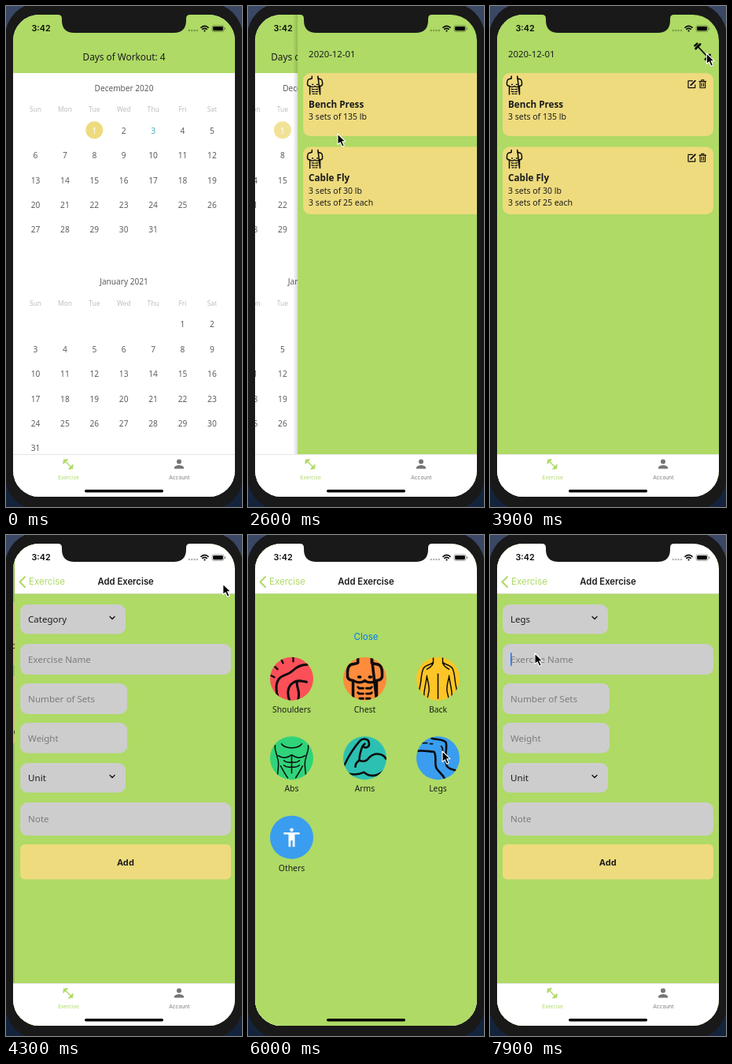
Animation of 300x635 px, one loop 8 s. Source, as an HTML page:

```html
<!DOCTYPE html>
<html lang="en">
<head>
<meta charset="utf-8">
<title>Workout planner</title>
<style>
  html, body { margin: 0; width: 100%; height: 100%; overflow: hidden; background: #14233c; }
  svg { display: block; width: 300px; height: 635px; }
  text { font-family: "Noto Sans", "Open Sans", sans-serif; fill: #1c1c1c; white-space: pre; }
  .ui { font-family: Inter, "Liberation Sans", sans-serif; }
  .mid { text-anchor: middle; }
  .b { font-weight: 600; }
  .line { fill: none; stroke: #0c0c0c; stroke-linecap: round; stroke-linejoin: round; }
</style>
</head>
<body>
<svg id="stage" viewBox="0 0 300 635" xmlns="http://www.w3.org/2000/svg"></svg>
<script>
const GREEN = '#aeda65', YELLOW = '#eedb7e', GRAY = '#cdcdcd';
const WIDTH = 282, LOOP = 8000, STEP = 100;

// y is the middle of the line
const text = (s, x, y, size, cls = '', fill = '#1c1c1c') =>
  `<text x="${x}" y="${y + size * 0.36}" font-size="${size}" class="${cls}" style="fill:${fill}">${s}</text>`;
const rect = (x, y, w, h, fill, r = 0) =>
  `<rect x="${x}" y="${y}" width="${w}" height="${h}" rx="${r}" fill="${fill}"/>`;
const line = (d, w = 1.5, color = '#0c0c0c') =>
  `<path class="line" d="${d}" stroke-width="${w}" style="stroke:${color}"/>`;
const at = (x, y, body, scale = 1) => `<g transform="translate(${x} ${y}) scale(${scale})">${body}</g>`;
const mirror = body => body + `<g transform="scale(-1 1)">${body}</g>`;
const group = (id, body) => `<g id="${id}">${body}</g>`;

function month(title, y, first, days, mark, today) {
  const col = i => 37.5 + 37.4 * i;
  let out = text(title, 150, y, 10.1, 'mid', '#5c5c5c');
  'Sun Mon Tue Wed Thu Fri Sat'.split(' ').forEach((d, i) => {
    out += text(d, col(i), y + 27, 8.4, 'mid', '#bdbdbd');
  });
  for (let d = 1; d <= days; d++) {
    const n = first + d - 1, x = col(n % 7), dy = y + 54.3 + 31.35 * Math.floor(n / 7);
    if (d === mark) out += group('mark', `<circle cx="${x}" cy="${dy - 1}" r="11" fill="${YELLOW}"/>`);
    out += text(d, x, dy, 10.2, 'mid', d === mark ? '#fff' : d === today ? '#3fafc4' : '#5e5e5e');
  }
  return out;
}

const calendar = rect(9, 11, WIDTH, 611, '#fff') + rect(9, 11, WIDTH, 74, GREEN) +
  text('Days of Workout: 4', 150, 64.7, 11.8, 'mid') +
  month('December 2020', 104, 2, 31, 1, 3) + month('January 2021', 349.5, 5, 31);

const chest = line('M-4 -12 V-9.2 C-5.5 -8.4 -7 -8.6 -8.2 -8 C-9.8 -7 -10 -5.5 -10 -3.5 V-1.2 C-9.8 .4 -8.4 .9 -6.8 1 V12 M6.8 12 V1 C8.4 .9 9.8 .4 10 -1.2 V-3.5 C10 -5.5 9.8 -7 8.2 -8 C7 -8.6 5.5 -8.4 4 -9.2 V-12 Z', 1.6) +
  line('M-6.5 1 C-4.5 2.6 -1.5 2.4 0 1 C1.5 2.4 4.5 2.6 6.5 1', 1.4) +
  mirror(line('M-3.6 -1 H-2.6', 1.5) + line('M-.9 5.5 H-3.2 L-4 4.8 M-.9 8.6 H-3.2 L-4 8 M-.9 11.4 H-3', 1.3));

const edit = line('M1 -4 H-4.5 V4.8 H4.2 V1', 1.2) + line('M-1.2 1.5 L4.3 -4', 1.9);
const trash = line('M-4.3 -3.2 H4.3 M-1.5 -3.4 V-5 H1.5 V-3.4 M-3.3 -3 V5 H3.3 V-3 M-1.2 -1 V3 M1.2 -1 V3', 1.1);
const barbell = line('M-7 -7.5 L7 7.5', 1.8) +
  [-1, 1].map(s => line(`M${s * 9} ${s * 4} L${s * 3.5} ${s * 9.5}`, 3) +
    line(`M${s * 10.2} ${s * 7.6} L${s * 7.2} ${s * 10.4}`, 2.4)).join('');

const card = (y, h, title, sets) => rect(16, y, 268, h, YELLOW, 9) +
  at(31, y + 15.5, chest, 0.95) + at(256.5, y + 13.8, edit) + at(270.3, y + 13.8, trash) +
  text(title, 23, y + 39.3, 11.7, 'b') +
  sets.map((s, i) => text(s, 23, y + 55.7 + 15.5 * i, 10.5)).join('');

const shadow = '<rect x="3" y="11" width="6" height="611" fill="url(#edge)"/>';

const list = shadow + rect(9, 11, WIDTH, 611, GREEN) +
  text('2020-12-01', 23, 61, 11.4) + at(270.5, 58, barbell) +
  card(85, 80, 'Bench Press', ['3 sets of 135 lb']) +
  card(178.5, 85.5, 'Cable Fly', ['3 sets of 30 lb', '3 sets of 25 each']);

const field = (y, w, h, label, fill = '#7c7c7c') =>
  rect(16, y, w, h, GRAY, 9) + text(label, 26, y + h / 2 + 0.3, 11.6, '', fill);
const chevron = y => line(`M130 ${y - 1.5} l3 3 l3 -3`, 1.3);

const form = shadow + rect(9, 11, WIDTH, 611, GREEN) + rect(9, 11, WIDTH, 63.5, '#fff') +
  rect(9, 74, WIDTH, 0.6, '#c9cfc0') +
  line('M22 53 L15.5 59.5 L22 66', 2, GREEN) +
  text('Exercise', 27, 59.2, 11.5, 'ui', GREEN) +
  text('Add Exercise', 150, 59.2, 11.3, 'ui mid b') +
  rect(16, 88, 134, 37.5, GRAY, 9) +
  group('pick', text('Category', 26, 107, 11.5)) + group('picked', text('Legs', 26, 107, 11.5)) + chevron(105) +
  field(138, 268, 39, 'Exercise Name') + field(188, 136, 39, 'Number of Sets') +
  field(238, 136, 38.5, 'Weight') + field(289, 134, 37.5, 'Unit', '#1c1c1c') + chevron(306) +
  field(339, 268, 42, 'Note') + rect(16, 392, 268, 44.5, YELLOW, 6) +
  text('Add', 150, 414.5, 11.2, 'mid b') +
  group('caret', rect(26, 149, 1.7, 17, '#2f7bea', 0.8));

// Each muscle icon is drawn around the middle of its disc
const muscles = [
  ['Shoulders', '#fb5058', line('M-17 25 C-20 17 -21 6 -16 0 C-11 -6 -5 -4 1 -10 C6 -15 11 -18 20 -18 M-3 27 C-6 18 -5 9 2 5 C7 1 13 3 19 4 M7 3 C5 11 12 15 8 27', 3) +
    line('M-26 -4 L-22 -2 M-21 -15 L-18 -12 M-13 -24 L-11 -20 M2 -27 V-22', 2.4)],
  ['Chest', '#fd8c3c', at(0, 0, chest, 2.2)],
  ['Back', '#fdc526', mirror(line('M-6 -27 V-21 C-9 -17 -17 -18 -19 -12 C-22 -4 -21 3 -23 10 C-25 16 -24 20 -24 25 M-14 -4 C-15 6 -18 12 -18 25 M-14 -2 C-12 6 -10 12 -12 18 L-14 27 M-6 -20 C-8 -15 -11 -14 -14 -12', 1.5)) +
    line('M0 -6 V25', 1.5)],
  ['Abs', '#2fd37a', mirror(line('M-21 -16 C-22 -10 -19 -6 -18 0 C-15 8 -18 14 -18 24 M-13 -18 C-10 -14 -5 -13 0 -13 M-17 -3 C-12 1 -5 0 0 -4 M-10 3 C-7 6 -3 6 0 5 M-10 9 C-7 12 -3 12 0 11 M-14 10 C-11 15 -9 20 -5 25', 1.5)) +
    line('M0 -4 V19', 1.5)],
  ['Arms', '#2cc0b2', line('M-26 9 C-20 -4 -14 -13 -6 -22 C-2 -26 5 -24 5 -20 C7 -15 2 -11 -3 -15 C-5 -10 -7 -4 -7 3 C-2 5 2 4 5 0 C11 -7 22 -7 27 1 M-24 19 C-14 22 -7 21 -1 18 C7 25 18 23 26 14 M-7 3 C-10 5 -12 8 -12 11 M-3 -15 L0 -18', 2.6)],
  ['Legs', '#3a9def', line('M-8 -25 C0 -23 6 -24 10 -20 C12 -14 9 -8 10 2 C10 9 11 12 17 14 L27 17 M-25 -9 C-18 -10 -10 -8 -5 -8 C-1 -2 -5 7 -2 13 C1 18 6 20 9 27', 2.6) +
    line('M-22 -19 H-14 M-10 -18 H-7 M4 -15 C6 -14 6 -12 6 -9', 1.8)],
  ['Others', '#3a9def', '<circle cy="-9.5" r="2.3" fill="#fff"/>' +
    line('M-9 -5 H9', 2.5, '#fff') + '<path d="M-4 -6 H4 V12 H1.2 V4 H-1.2 V12 H-4Z" fill="#fff"/>']
];

const sheet = rect(9, 74.6, WIDTH, 560, GREEN) + text('Close', 150, 128.8, 11.5, 'ui mid', '#007aff') +
  muscles.map(([name, color, art], i) => {
    const x = 55.5 + 93 * (i % 3), y = 182.2 + 100.5 * Math.floor(i / 3);
    return at(x, y, `<circle r="27.5" fill="${color}"/><g clip-path="url(#disc)">${art}</g>`) +
      text(name, x, y + 38.6, 10.4, 'mid');
  }).join('');

const weights = 'M20.57 14.86L22 13.43 20.57 12 17 15.57 8.43 7 12 3.43 10.57 2 9.14 3.43 7.71 2 5.57 4.14 4.14 2.71 2.71 4.14l1.43 1.43L2 7.71l1.43 1.43L2 10.57 3.43 12 7 8.43 15.57 17 12 20.57 13.43 22l1.43-1.43L16.29 22l2.14-2.14 1.43 1.43 1.43-1.43-1.43-1.43L22 16.29z';
const tabs = rect(9, 568, WIDTH, 54, '#fff') + rect(9, 568, WIDTH, 0.7, '#dcdcdc') +
  at(70.6, 572.4, `<path d="${weights}" fill="${GREEN}"/>`, 0.7) +
  at(220, 580.4, '<circle cy="-3" r="3" fill="#757575"/><path d="M-6 6 V4.5 C-6 2.5 -2 1.5 0 1.5 S6 2.5 6 4.5 V6Z" fill="#757575"/>') +
  text('Exercise', 79.5, 597.5, 6.7, 'ui mid', GREEN) + text('Account', 220.3, 597.5, 6.6, 'ui mid', '#777');

const status = text('3:42', 32.5, 28.3, 10.8, 'ui b', '#0c0c0c') +
  [0, 1, 2, 3].map(i => `<circle cx="${232.8 + 3.4 * i}" cy="31" r="1.2" fill="#000" opacity=".3"/>`).join('') +
  at(252.5, 31.5, line('M-4.6 -4.2 Q0 -8 4.6 -4.2 M-2.7 -2.1 Q0 -4.3 2.7 -2.1', 1.6) + '<circle r="1.1"/>') +
  '<rect x="262" y="24.8" width="15" height="7.6" rx="2.2" fill="none" stroke="#000" stroke-opacity=".45" stroke-width=".8"/>' +
  rect(263.2, 26, 12.6, 5.2, '#000', 1.2) + rect(278, 27.2, 1, 2.8, '#777', 0.5);

document.getElementById('stage').innerHTML = `
  <defs>
    <clipPath id="screen"><rect x="9" y="11" width="${WIDTH}" height="611" rx="33"/></clipPath>
    <clipPath id="disc"><circle r="27.5"/></clipPath>
    <linearGradient id="edge"><stop stop-opacity="0"/><stop offset="1" stop-opacity=".15"/></linearGradient>
    <linearGradient id="desk" x2="0" y2="1"><stop stop-color="#3a4866"/><stop offset="1" stop-color="#14233c"/></linearGradient>
  </defs>` +
  rect(0, 0, 300, 635, 'url(#desk)') + rect(-1, -4, 302, 643, '#191919', 43) +
  '<g clip-path="url(#screen)">' +
  group('calendar', calendar) + group('list', list) + group('form', form) + tabs + group('sheet', sheet) +
  status + '</g>' +
  '<path d="M66 10 H234 V11 Q229 11 229 16 V18 Q229 34 213 34 H87 Q71 34 71 18 V16 Q71 11 66 11Z" fill="#191919"/>' +
  rect(100, 613, 100, 3.4, '#000', 1.7) +
  group('cursor', '<path d="M0 0 V13.5 L3.2 10.8 L5.7 16.2 L8.3 15 L5.8 9.8 H10Z" stroke="#fff" stroke-width="1.1" stroke-linejoin="round"/>');

const el = id => document.getElementById(id);
const move = (id, x, y = 0) => el(id).setAttribute('transform', `translate(${x.toFixed(2)} ${y.toFixed(2)})`);
const show = (id, amount) => el(id).setAttribute('opacity', +amount);

// Critically damped spring: the share of the way still to go
function left(t, start) {
  const k = Math.max(0, t - start) * 0.01826;
  const rest = Math.exp(-k) * (1 + k);
  return rest < 0.001 ? 0 : rest;
}

// time, x, y of the pointer tip
const path = [
  [0, -20, 330], [900, 62, 300], [1500, 62, 300], [2100, 114, 162], [3200, 114, 162],
  [3900, 275.3, 60], [4300, 275.8, 62], [4700, 97.5, 104], [5400, 97.5, 104],
  [5900, 247, 274], [6500, 247, 274], [6700, 254, 222], [7200, 57, 150]
];

function pointer(t) {
  const i = path.findIndex(p => p[0] > t);
  if (i < 0) return path[path.length - 1].slice(1);
  const [t0, x0, y0] = path[i - 1], [t1, x1, y1] = path[i];
  const u = (t - t0) / (t1 - t0), e = u * u * (3 - 2 * u);
  return [x0 + (x1 - x0) * e, y0 + (y1 - y0) * e];
}

const began = performance.now();
function draw() {
  const now = (performance.now() - began) % LOOP;
  const t = Math.floor(now / STEP) * STEP;
  const a = left(t, 2433), b = left(t, 3918);
  move('calendar', -0.3 * WIDTH * (1 - a));
  move('list', WIDTH * a - 0.3 * WIDTH * (1 - b));
  move('form', WIDTH * b);
  move('sheet', 0, 560 * (t < 6500 ? left(t, 4800) : 1 - left(t, 6532)));
  show('list', a < 1);
  show('form', b < 1);
  show('mark', t < 2300 ? 1 : 0.8);
  show('pick', t < 6500);
  show('picked', t >= 6500);
  show('caret', t < 7200 ? 0 : t < 7500 || t >= 7900 ? 1 : t < 7600 ? 0.5 : 0);
  move('cursor', ...pointer(t));
  requestAnimationFrame(draw);
}
draw();
</script>
</body>
</html>
```
